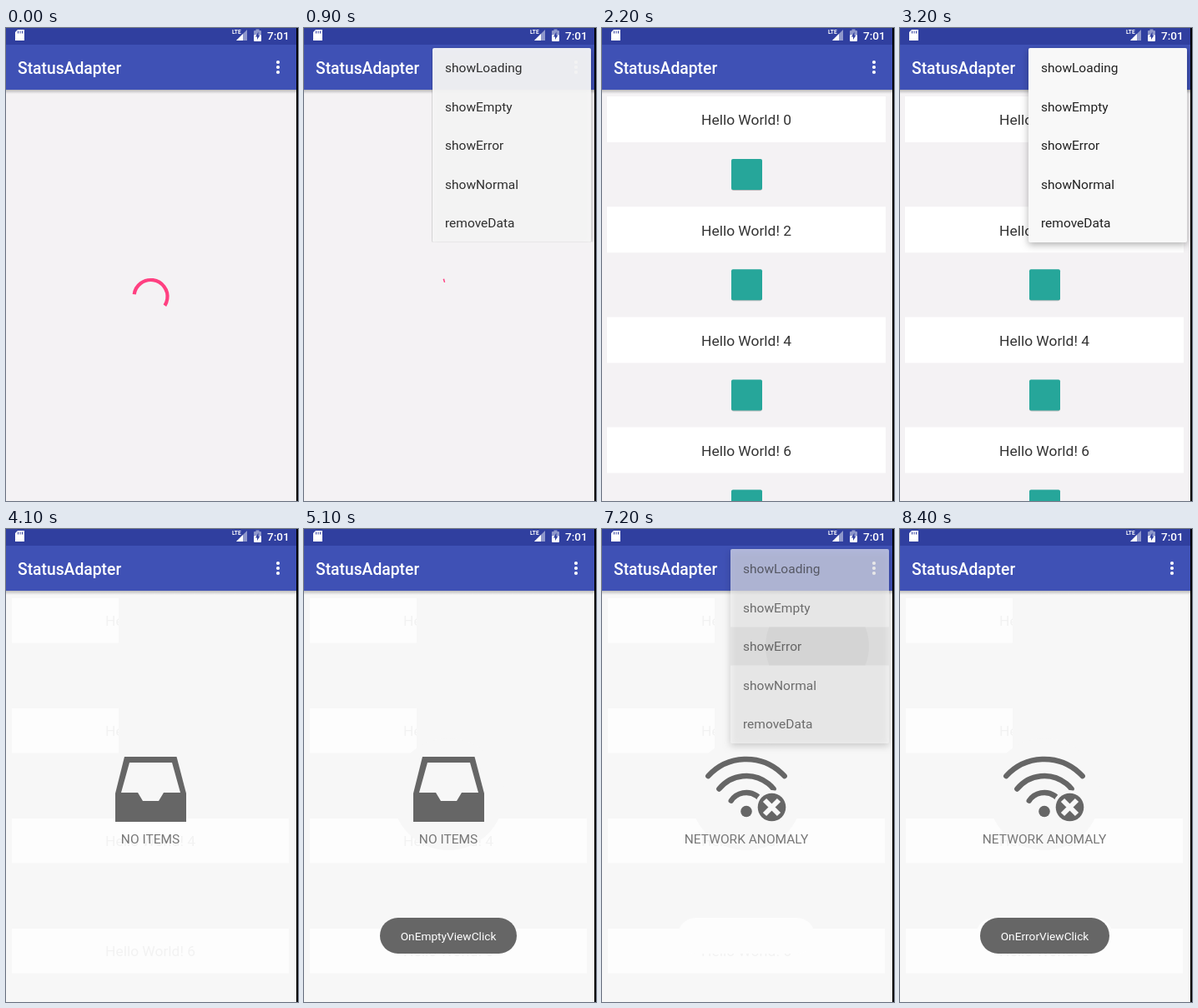
An HTML page with a canvas that plays this animation: 350 by 567 pixels, repeating every 8800 ms.

```html
<!DOCTYPE html>
<html lang="en">
<head>
<meta charset="utf-8">
<title>StatusAdapter</title>
<style>
  html, body { margin: 0; width: 100%; height: 100%; overflow: hidden; background: #f4f2f4; }
  canvas { display: block; }
</style>
</head>
<body>
<canvas id="stage" width="350" height="567"></canvas>
<script>
const ctx = document.getElementById('stage').getContext('2d');
const LOOP = 8800, STEP = 100, TAU = Math.PI * 2;
const GREY = '#666', PAPER = '#f7f7f7';
const MENU = { x: 154, y: 24, w: 190, h: 233, row: 46.6,
  items: ['showLoading', 'showEmpty', 'showError', 'showNormal', 'removeData'] };
// Each visit to the menu: first opening step, first closing step, chosen row.
const VISITS = [
  { open: 700, close: 1900, row: 3 },
  { open: 2900, close: 3800, row: 1 },
  { open: 6000, close: 7100, row: 2 }
];

const clamp = v => Math.max(0, Math.min(1, v));
// Progress that reaches 1/4 on the first step and 1 on the fourth.
const fourSteps = (t, first) => clamp((t - first + STEP) / (4 * STEP));

function box(x, y, w, h, color, radius = 0) {
  ctx.fillStyle = color;
  ctx.beginPath();
  ctx.roundRect(x, y, w, h, radius);
  ctx.fill();
}

function disc(x, y, r, color) {
  ctx.fillStyle = color;
  ctx.beginPath();
  ctx.arc(x, y, r, 0, TAU);
  ctx.fill();
}

function polygon(points, color) {
  ctx.fillStyle = color;
  ctx.beginPath();
  points.forEach(([x, y]) => ctx.lineTo(x, y));
  ctx.fill();
}

function arc(x, y, r, from, to, width, color, cap = 'round') {
  ctx.strokeStyle = color;
  ctx.lineWidth = width;
  ctx.lineCap = cap;
  ctx.beginPath();
  ctx.arc(x, y, r, from * TAU / 360, to * TAU / 360);
  ctx.stroke();
}

function label(str, x, y, size, color, align = 'left', weight = 400) {
  ctx.font = `${weight} ${size}px Roboto, sans-serif`;
  ctx.textAlign = align;
  ctx.fillStyle = color;
  ctx.fillText(str, x, y);
}

function clipped(x, y, w, h, draw) {
  ctx.save();
  ctx.beginPath();
  ctx.rect(x, y, w, h);
  ctx.clip();
  draw();
  ctx.restore();
}

// cubic-bezier(.4, 0, .2, 1)
function fastOutSlowIn(x) {
  let lo = 0, hi = 1, s;
  for (let i = 0; i < 20; i++) {
    s = (lo + hi) / 2;
    const bx = 1.2 * (1 - s) ** 2 * s + 0.6 * (1 - s) * s * s + s ** 3;
    if (bx < x) lo = s; else hi = s;
  }
  return s * s * (3 - 2 * s);
}

function spinner(t) {
  const cycle = (t + 324) / 1333, p = cycle % 1;
  const head = 0.75 * fastOutSlowIn(clamp(p * 2));
  const tail = 0.75 * fastOutSlowIn(clamp(p * 2 - 1));
  const turn = 188 + t * 720 / 6665 + 360 * 0.25 * (p - 0.243);
  arc(173.5, 322, 20, turn + 360 * tail, turn + 360 * head, 4.2, '#ff4081', 'butt');
}

function appBar() {
  const shade = ctx.createLinearGradient(0, 74, 0, 79);
  shade.addColorStop(0, 'rgba(0,0,0,.24)');
  shade.addColorStop(1, 'rgba(0,0,0,0)');
  box(0, 74, 348, 5, shade);
  box(0, 0, 348, 20, '#303f9f');
  box(0, 20, 348, 54, '#3f51b5');
  label('StatusAdapter', 14, 54.5, 19.3, '#fff', 'left', 500);
  [41, 47, 53].forEach(y => disc(326, y, 2.1, '#fff'));

  polygon([[14, 2], [22, 2], [22, 15], [11, 15], [11, 5]], '#fff');
  [14.5, 17, 19.5].forEach(x => box(x - 0.5, 3.5, 1, 3, '#303f9f'));
  label('LTE', 271, 7, 6.5, '#fff', 'left', 700);
  polygon([[289, 2], [289, 15], [276, 15]], '#8f98cb');
  polygon([[284, 7], [284, 15], [276, 15]], '#fff');
  box(299.5, 1.5, 4, 3, '#8f98cb');
  box(297, 3, 9, 5, '#8f98cb', 1);
  box(297, 8, 9, 8, '#fff', 1);
  polygon([[302.5, 4.5], [299, 10.5], [301, 10.5], [301, 14], [304.5, 8.5], [302.5, 8.5]], '#303f9f');
  label('7:01', 313, 13.7, 13.6, '#fff', 'left', 500);
}

function list() {
  for (let i = 0; i < 4; i++) {
    const y = 82 + i * 132.2;
    box(6, y, 334, 55, '#fff');
    label(`Hello World! ${i * 2}`, 173, y + 34.3, 17.4, '#333', 'center');
    box(155, y + 76, 37, 37, 'rgba(0,0,0,.22)', 3);
    box(155, y + 75, 37, 37, '#26a69a', 2);
  }
}

// Faint traces of the list that stay behind the status views.
function listTraces(t) {
  for (let i = 0; i < 4; i++) {
    const y = 83 + i * 132;
    clipped(0, y, i < 2 ? 135 : 339, 54, () => {
      box(7, y, 332, 53.5, '#fdfdfd');
      label(`Hello World! ${i * 2}`, 173, y + 33.3, 17.4, '#f2f2f2', 'center');
    });
  }
  if (t >= 4800) disc(173, 318, 67, PAPER);
  if (t >= 6600) box(91, 466, 164, 43, '#fdfdfd', 21.5);
}

function emptyView() {
  polygon([[142, 273], [204.5, 273], [216, 317], [216, 351], [131, 351], [131, 317]], GREY);
  polygon([[148, 280], [199, 280], [209, 316], [189, 316], [183, 326], [164, 326], [158, 316], [138, 316]], PAPER);
  label('NO ITEMS', 173, 377.3, 15.5, '#777', 'center');
}

function errorView() {
  [[62, 47.5], [42, 51], [22, 56]].forEach(([r, half]) =>
    arc(173, 338, r, -90 - half, -90 + half, 6.4, GREY));
  disc(173, 338.5, 6.8, GREY);
  disc(203.5, 333.5, 20.5, PAPER);
  disc(203.5, 333.5, 16.8, GREY);
  ctx.strokeStyle = PAPER;
  ctx.lineWidth = 6;
  ctx.lineCap = 'butt';
  ctx.beginPath();
  for (const k of [-1, 1]) {
    ctx.moveTo(203.5 - 8.5, 333.5 - 8.5 * k);
    ctx.lineTo(203.5 + 8.5, 333.5 + 8.5 * k);
  }
  ctx.stroke();
  label('NETWORK ANOMALY', 173, 377.3, 15.5, '#777', 'center');
}

function tapRipple(t, start, end) {
  if (t < start || t >= end) return;
  const p = (t - start + STEP) / (end - start);
  disc(173, 318, 67 * Math.min(1, 0.4 + p), `rgba(0,0,0,${0.05 * (1.2 - p)})`);
}

function toast(str, x, w, alpha) {
  if (alpha <= 0) return;
  ctx.save();
  ctx.globalAlpha = alpha;
  box(x, 466, w, 43, GREY, 21.5);
  label(str, x + w / 2, 493.3, 13.7, '#fff', 'center');
  ctx.restore();
}

function menuBody(visit, closingStep) {
  const { x, y, w, h, row, items } = MENU;
  ctx.save();
  ctx.shadowColor = 'rgba(0,0,0,.3)';
  ctx.shadowBlur = 9;
  ctx.shadowOffsetY = 3;
  box(x, y, w, h, '#f8f8f8', 2);
  ctx.restore();
  if (closingStep > 0) {
    const top = y + visit.row * row;
    clipped(x, top, w, row, () => {
      box(x, top, w, row, 'rgba(0,0,0,.08)');
      disc(230 + 14 * closingStep, top + row / 2, 31 * closingStep, 'rgba(0,0,0,.05)');
    });
  }
  items.forEach((item, i) => label(item, 169, 53 + i * row, 15.5, '#212121'));
}

function menu(t) {
  const visit = VISITS.find(v => t >= v.open && t < v.close + 3 * STEP);
  if (!visit) return;
  const opened = 1 - (1 - fourSteps(t, visit.open)) ** 2;
  const closingStep = Math.max(0, (t - visit.close) / STEP + 1);
  const fade = closingStep ? 0.92 - 0.3 * (closingStep - 1) : 1;
  const width = 208 * opened, height = 250 * opened;
  clipped(348 - width, 22, width, height, () => {
    ctx.globalAlpha = opened * fade;
    menuBody(visit, closingStep);
  });
}

function render(t) {
  const statusView = t >= 3800;
  box(0, 0, 350, 567, statusView ? PAPER : '#f4f2f4');
  if (t < 1900) spinner(t);
  else if (!statusView) list();
  else {
    listTraces(t);
    if (t < 7100) emptyView(); else errorView();
    tapRipple(t, 4800, 5100);
    tapRipple(t, 8000, 8400);
  }
  appBar();
  toast('OnEmptyViewClick', 91, 164, fourSteps(t, 4800) - fourSteps(t, 6600));
  toast('OnErrorViewClick', 96, 155, fourSteps(t, 8100));
  menu(t);
  box(348, 0, 2, 567, '#000');
}

function tick() {
  render(Math.floor(performance.now() % LOOP / STEP) * STEP);
  requestAnimationFrame(tick);
}
tick();
</script>
</body>
</html>
```
